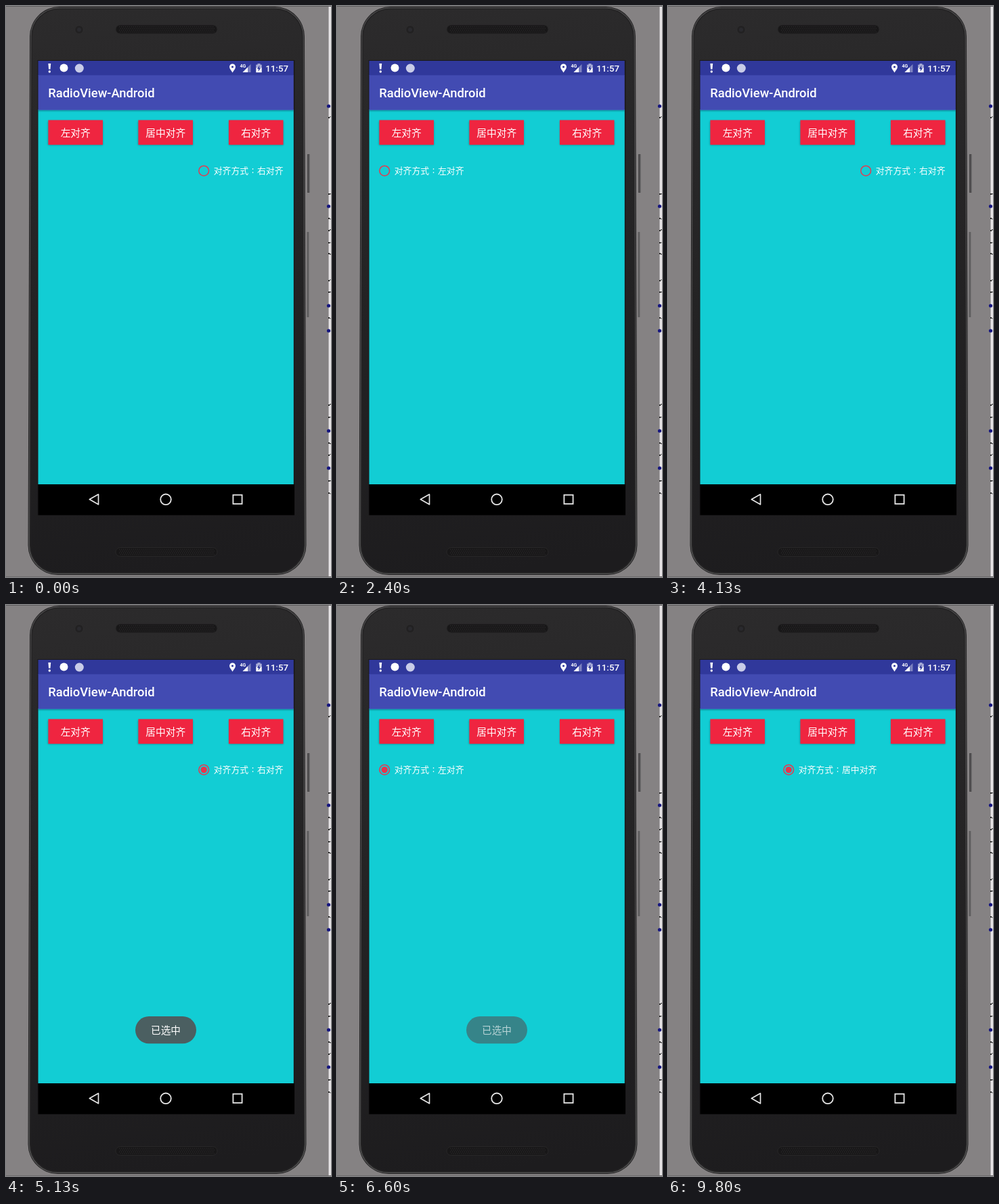
An HTML page with a canvas for the animation above (9870 ms loop, 480 by 844 pixels).

```html
<!DOCTYPE html>
<html lang="zh">
<head>
<meta charset="utf-8">
<title>RadioView-Android</title>
<style>
html, body { margin: 0; width: 100%; height: 100%; overflow: hidden; background: #858283; }
canvas { display: block; }
</style>
</head>
<body>
<canvas id="stage" width="480" height="844"></canvas>
<script>
const W = 480, H = 844, LOOP = 9870;
const HAN = '"Noto Sans CJK SC", "Noto Sans CJK JP", "Noto Sans CJK", sans-serif';
const LATIN = 'Roboto, sans-serif';
const RED = '#ef2540', CYAN = '#12cdd4';
const LEFT = 47.5, WIDE = 377.3;

// Start time, label, ring centre
const STEPS = [
  [0, '右对齐', 292.2],
  [1070, '左对齐', 70.2],
  [2870, '居中对齐', 178.2],
  [3870, '右对齐', 292.2],
  [5930, '左对齐', 70.2],
  [8870, '居中对齐', 178.2]
];
const CHECK = 4330, FADE_OUT = 6400, FADE = 500;

const stage = document.getElementById('stage').getContext('2d');
const backdrop = document.createElement('canvas');
backdrop.width = W;
backdrop.height = H;
let g = backdrop.getContext('2d');

function rect(x, y, w, h, fill) {
  g.fillStyle = fill;
  g.fillRect(x, y, w, h);
}

function paint(fill, stroke, line) {
  if (fill) { g.fillStyle = fill; g.fill(); }
  if (stroke) { g.strokeStyle = stroke; g.lineWidth = line; g.stroke(); }
}

function round(x, y, w, h, r, fill, stroke, line = 1) {
  g.beginPath();
  g.roundRect(x, y, w, h, r);
  paint(fill, stroke, line);
}

function circle(x, y, r, fill, stroke, line = 1) {
  g.beginPath();
  g.arc(x, y, r, 0, Math.PI * 2);
  paint(fill, stroke, line);
}

function poly(points, fill, stroke, line = 1) {
  g.beginPath();
  points.forEach(([x, y]) => g.lineTo(x, y));
  g.closePath();
  paint(fill, stroke, line);
}

function text(str, x, y, font, align = 'left') {
  g.font = font;
  g.textAlign = align;
  g.fillStyle = '#fff';
  g.fillText(str, x, y);
}

function gradient(x0, y0, x1, y1, ...colors) {
  const grad = g.createLinearGradient(x0, y0, x1, y1);
  colors.forEach((c, i) => grad.addColorStop(i / (colors.length - 1), c));
  return grad;
}

// Slightly wider at the bottom than at the top
function bodyPath(inset) {
  const top = 35 + inset, low = 32.5 + inset, t = 1 + inset, b = 841 - inset, r = 44 - inset;
  const mirror = x => 476 - x;
  g.beginPath();
  g.moveTo(top, t + r);
  g.arcTo(top, t, top + r, t, r);
  g.lineTo(mirror(top + r), t);
  g.arcTo(mirror(top), t, mirror(top), t + r, r);
  g.lineTo(mirror(low), b - r);
  g.arcTo(mirror(low), b, mirror(low + r), b, r);
  g.lineTo(low + r, b);
  g.arcTo(low, b, low, b - r, r);
  g.closePath();
}

function speaker(y) {
  round(162, y, 150, 13, 6.5, '#181718', '#282728');
  g.fillStyle = '#2b2a2b';
  for (let row = 0; row < 4; row++)
    for (let x = 167 + row % 2 * 1.5; x < 308; x += 3) g.fillRect(x, y + 2 + row * 2.6, 1.3, 1.3);
}

// Sliver of an editor window beside the phone
function editorEdge() {
  rect(476, 0, 1, H, '#b0adaf');
  rect(477, 0, 3, H, '#e6e3e5');
  const black = [165, 278, 314, 332, 350, 366, 406, 423, 461, 590, 608, 646, 664, 702, 720];
  const blue = [148, 296, 443, 480, 628, 683];
  black.forEach((y, i) => {
    rect(476, y - 1, 2, 2, '#222');
    rect(478, y + (i % 3) - 2, 2, 1.5, i % 2 ? '#555' : '#888');
  });
  blue.forEach(y => circle(476.5, y, 2.6, '#15157f'));
}

function phone() {
  rect(445, 219, 3.3, 57, '#4b494a');
  rect(447.3, 220, 1, 55, '#626061');
  rect(444.5, 334, 2.8, 126, '#5f5d5e');
  bodyPath(0);
  paint('#232223');
  bodyPath(1.7);
  paint(null, gradient(0, 0, 0, H, '#484748', '#454445', '#505050'), 1.5);
  bodyPath(4);
  paint(gradient(60, 0, 200, H, '#2c2b2c', '#242324', '#1d1c1e'));
  speaker(28);
  speaker(800.5);
  circle(108, 35, 6.3, '#222122', '#302f30');
  circle(108, 35, 3, '#2a2a2e');
  rect(46.5, 80, 380, 673, '#1a191a');
}

function statusBar() {
  rect(LEFT, 81, WIDE, 22, '#30389b');
  poly([[62.4, 85], [66.2, 85], [65.5, 93.5], [63.1, 93.5]], '#fff');
  circle(64.3, 97, 1.7, '#fff');
  circle(85.5, 91.5, 6, '#fff');
  circle(108.3, 92, 6.5, '#c9cce8');

  // Location pin
  g.beginPath();
  g.moveTo(334.5, 98.5);
  g.bezierCurveTo(332.5, 95, 330, 92.5, 330, 90);
  g.arc(334.5, 90, 4.5, Math.PI, 0);
  g.bezierCurveTo(339, 92.5, 336.5, 95, 334.5, 98.5);
  paint('#fff');
  circle(334.5, 90, 1.6, '#30389b');

  // Signal
  poly([[361.5, 86], [361.5, 98], [349.5, 98]], '#7b80bf');
  poly([[357, 90.5], [357, 98], [349.5, 98]], '#fff');
  text('4G', 345.5, 91, '700 7px ' + LATIN);

  // Battery
  rect(371.5, 85.2, 4, 2, '#a9add8');
  rect(369.3, 86.7, 8.4, 4.5, '#a9add8');
  rect(369.3, 91.2, 8.4, 7, '#fff');
  poly([[374.5, 87.5], [371, 93], [373, 93], [372.6, 97], [376.2, 91.5], [374, 91.5]], '#30389b');
  text('11:57', 417, 96.8, '500 13.3px ' + LATIN, 'right');
}

function button(label, x) {
  g.shadowColor = 'rgba(0,50,60,.4)';
  g.shadowBlur = 3;
  g.shadowOffsetY = 1;
  rect(x, 168.6, 80.6, 36.6, RED);
  g.shadowColor = 'transparent';
  text(label, x + 40.3, 192.7, '14.7px ' + HAN, 'center');
}

function navBar() {
  rect(LEFT, 707, 378.5, 45.5, '#000');
  g.lineJoin = 'round';
  poly([[123.3, 729.3], [136.5, 721.8], [136.5, 736.8]], null, '#e6e6e6', 1.7);
  circle(236, 729.3, 7.8, null, '#e6e6e6', 1.8);
  g.lineJoin = 'miter';
  g.strokeRect(335.4, 722.7, 13.2, 13.2);
}

function drawBackdrop() {
  rect(0, 0, W, H, '#858283');
  editorEdge();
  rect(0, 0, W, 1, '#5f5d5e');
  rect(0, 843, W, 1, '#6d6b6c');
  phone();
  rect(LEFT, 153, WIDE, 554, CYAN);
  rect(LEFT, 154, WIDE, 3, gradient(0, 154, 0, 157, 'rgba(0,50,70,.35)', 'rgba(0,50,70,0)'));
  statusBar();
  rect(LEFT, 102.3, WIDE, 51.5, '#424bb2');
  text('RadioView-Android', 62.2, 135.2, '500 18.4px ' + LATIN);
  button('左对齐', 62.4);
  button('居中对齐', 195.4);
  button('右对齐', 328.9);
  navBar();
}

function radio(label, x, checked) {
  const em = 12.85, font = em + 'px ' + HAN, start = x + 14.5, y = 248.4;
  circle(x, 243.6, 7.4, null, '#e23c52', 1.5);
  if (checked) circle(x, 243.6, 4.7, '#e8344c');
  text('对齐方式', start, y, font);
  text(':', start + em * 4.5, y - 1.5, font, 'center');
  text(label, start + em * 5, y, font);
}

function toast(alpha) {
  if (alpha <= 0) return;
  g.globalAlpha = alpha;
  round(191, 608, 90, 40.3, 20.1, '#4b5f61');
  text('已选中', 236, 633.8, '14.6px ' + HAN, 'center');
  g.globalAlpha = 1;
}

const clamp = v => Math.max(0, Math.min(1, v));
const ease = v => 0.5 - Math.cos(clamp(v) * Math.PI) / 2;

function frame(now) {
  const t = now % LOOP;
  const [, label, x] = STEPS.filter(s => s[0] <= t).pop();
  g.drawImage(backdrop, 0, 0);
  radio(label, x, t >= CHECK);
  toast(ease((t - CHECK) / FADE) - ease((t - FADE_OUT) / FADE));
  requestAnimationFrame(() => frame(performance.now()));
}

drawBackdrop();
g = stage;
frame(performance.now());
</script>
</body>
</html>
```
